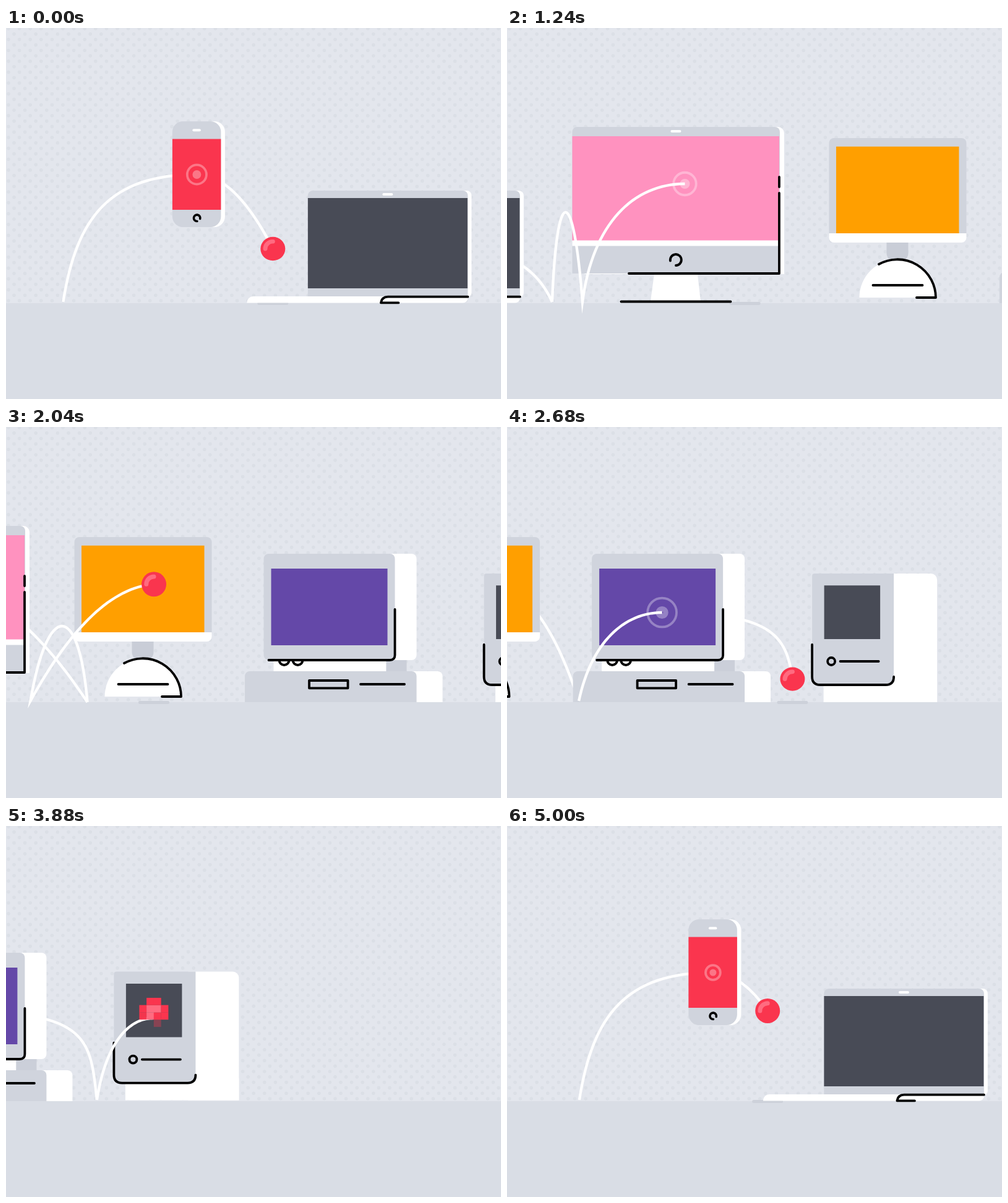
Recreate the animation shown at these times as an HTML page with a canvas. Size 800 by 600 pixels, loop 5040 ms.

```html
<!DOCTYPE html>
<html lang="en">
<head>
<meta charset="utf-8">
<title>Bouncing through devices</title>
<style>
html, body { margin: 0; width: 100%; height: 100%; overflow: hidden; background: #e3e6ed; }
canvas { display: block; }
</style>
</head>
<body>
<canvas id="stage" width="800" height="600"></canvas>
<script>
const LOOP = 5040, FLOOR = 445;
const WHITE = '#fff', GRAY = '#d0d4dd', DARK = '#484b56', RED = '#fa354e', BLUSH = '#ff6b80';
const ctx = document.getElementById('stage').getContext('2d');
const clamp = v => Math.max(0, Math.min(1, v));
const span = (t, a, b) => clamp((t - a) / (b - a));

// Camera: [time, x], smooth through all points
const camKeys = [[-800, -375], [-560, -294], [-40, -24.5], [0, 0], [800, 477], [1240, 725.5],
  [2040, 1135.5], [2680, 1415], [3360, 1643], [3880, 1734], [4100, 1745]];

function slope(i) {
  if (i < 1 || i >= camKeys.length - 1) return 0;
  const [p, q, r] = camKeys.slice(i - 1, i + 2);
  const h0 = q[0] - p[0], h1 = r[0] - q[0];
  return (h1 * (q[1] - p[1]) / h0 + h0 * (r[1] - q[1]) / h1) / (h0 + h1);
}

function camera(t) {
  const last = camKeys.length - 1;
  if (t <= camKeys[0][0]) return camKeys[0][1];
  if (t >= camKeys[last][0]) return camKeys[last][1];
  const i = camKeys.findIndex(k => k[0] > t) - 1;
  const [t0, x0] = camKeys[i], [t1, x1] = camKeys[i + 1];
  const h = t1 - t0, s = (t - t0) / h, r = 1 - s;
  return x0 * (1 + 2 * s) * r * r + x1 * s * s * (3 - 2 * s) +
    h * s * r * (r * slope(i) - s * slope(i + 1));
}

// Ball path: [time, x, y, ease a, ease b, hop height]
const nodes = [
  [-327, 93, 443],
  [-141, 309, 237, .1, .35],
  [45, 470, 443, .333, .667],
  [285, 619, 353, .12, .6],
  [571, 799, 443, .55, .85],
  [883, 848, 443, .15, .7, 145],
  [1062, 1013.5, 252, .1, .5],
  [1530, 1267.5, 445, .333, .667],
  [1816, 1175.5, 443, .15, .7, 122],
  [2050, 1383, 254, .333, .667],
  [2235, 1531.5, 443, .4, .72],
  [2400, 1666, 300, .15, .55],
  [2724, 1881, 443, .95, .95],
  [2900, 1971, 311, .15, .55]
];
const START = nodes[0][0], END = nodes[nodes.length - 1][0];

const segs = nodes.slice(1).map(([t1, x1, y1, a, b, hop = 0], i) => {
  const [t0, x0, y0] = nodes[i];
  const fall = !hop && y1 > y0;
  return {
    t0, t1, behind: fall || i === 0,
    at(t) {
      const s = (t - t0) / (t1 - t0), r = 1 - s;
      const fx = 3 * r * r * s * a + 3 * r * s * s * b + s * s * s;
      const fy = hop ? s : fall ? s * s : 1 - r * r;
      return [x0 + (x1 - x0) * fx, y0 + (y1 - y0) * fy - 4 * hop * s * r];
    }
  };
});
const landings = nodes.filter(n => n[2] > 440).map(n => n[0]);
const segAt = t => segs.find(s => t >= s.t0 && t < s.t1);

// Drawing helpers
function box(x0, y0, x1, y1, color, r = 0) {
  ctx.fillStyle = color;
  ctx.beginPath();
  ctx.roundRect(x0, y0, x1 - x0, y1 - y0, r);
  ctx.fill();
}
function disc(x, y, r, color) {
  ctx.fillStyle = color;
  ctx.beginPath();
  ctx.arc(x, y, r, 0, 7);
  ctx.fill();
}
function ink(d, width = 3.8, color = '#000', fill) {
  const p = new Path2D(d);
  ctx.lineWidth = width;
  ctx.lineCap = ctx.lineJoin = 'round';
  ctx.strokeStyle = color;
  if (fill) { ctx.fillStyle = fill; ctx.fill(p); }
  ctx.stroke(p);
}
function shape(d, color) {
  ctx.fillStyle = color;
  ctx.fill(new Path2D(d));
}
function at(x, y, draw) {
  ctx.save();
  ctx.translate(x, y);
  draw();
  ctx.restore();
}

// Devices, each in its own local frame
function phone() {
  box(10, 151, 85, 322, WHITE, 17);
  box(0, 151, 78.5, 322, GRAY, 17);
  box(0, 179.5, 78.5, 294, RED);
  box(32.5, 163.3, 46, 167.2, WHITE, 2);
  ink('M40 312.5A5.2 5.2 0 1 1 44.8 308.5', 3.6);
}
function laptop() {
  box(110, 263, 363, 436, WHITE, 8);
  box(98.5, 263, 357, 435, GRAY, [8, 8, 0, 0]);
  box(98.5, 275, 356.5, 421, DARK);
  box(219, 267, 236, 271, WHITE, 2);
  box(0, 434, 357, 444.5, WHITE, [10, 0, 8, 0]);
  ink('M357 434.7H228Q218 435 216.5 444.4H245');
}
function desktop() {
  box(20, 160, 342.5, 398, WHITE, [0, 10, 0, 0]);
  box(0, 160, 335.5, 397, GRAY, [8, 8, 0, 0]);
  box(0, 175, 334.5, 344, '#ff92bf');
  box(0, 343.5, 334.5, 352.5, WHITE);
  box(159, 165, 176, 169, WHITE, 2);
  shape('M132.5 398H202.5L207.5 442H126.5Z', WHITE);
  ink('M334.5 241V257M334.5 267V397H91.5M79 442.5H256');
  ink('M158.5 376.5A9 9 0 1 1 167.5 384');
}
function lamp() {
  box(93, 340, 128, 378, '#c9cdd7', [0, 0, 14, 14]);
  box(0, 178, 222, 342, GRAY, 8);
  box(11.5, 191.7, 210, 333, '#ff9f00');
  box(0, 332, 222, 347, WHITE, [0, 0, 8, 8]);
  shape('M49 436A62 62 0 0 1 173 436Z', WHITE);
  ink('M80.5 382A62 62 0 0 1 172.5 436H141.5M71 416H151');
}
function tower() {
  box(200, 395, 319.5, FLOOR, WHITE, [0, 8, 0, 0]);
  box(0, 395, 277.5, FLOOR, GRAY, [8, 8, 0, 0]);
  box(46.5, 376, 228.5, 395, WHITE);
  box(228.5, 376, 261.5, 395, '#cbcfd9');
  box(200, 205, 277.5, 377, WHITE, 8);
  ink('M55.5 377A8 8 0 0 0 71.5 377M77.5 377A8 8 0 0 0 93.5 377');
  box(30.5, 205, 242.5, 377, GRAY, 8);
  box(42.5, 229, 230.5, 353, '#6448a8');
  ink('M38.5 377H234Q242.5 377 242.5 369V295');
  ink('M104 410H166.5V422.3H104ZM187 416H258');
}
function classic(t) {
  box(18.5, 410, 202, FLOOR, WHITE);
  box(120, 237, 202, FLOOR, WHITE, [0, 10, 0, 0]);
  box(0, 237, 132, 417, GRAY, [4, 0, 12, 12]);
  box(19.5, 256.3, 110, 343, DARK);
  ink('M0 352V404Q0 417 13 417H119Q132 417 132 404');
  ink('M25 379a6 6 0 1 0 12 0a6 6 0 1 0 -12 0M45.5 379H107.5');
}

function pixels(t) {
  if (t < END) return;
  const c = 11.7;
  let n = 0;
  for (let row = 3; row >= 0; row--) {
    for (let col = 0; col < 4; col++) {
      const edgeRow = row % 3 === 0, edgeCol = col % 3 === 0;
      if (edgeRow && edgeCol) continue;
      const gone = 3850 + 15 * n++;
      ctx.globalAlpha = 1 - span(t, gone, gone + 25);
      const light = !edgeRow && !edgeCol && row + col < 4;
      const x = 41 + col * c, y = 279.3 + row * c;
      box(x, y, x + c + .2, y + c + .2, light ? BLUSH : RED);
    }
  }
  ctx.globalAlpha = 1;
}

function target(time, node) {
  const [hit, x, y] = nodes[node], age = time - hit;
  if (age < 0) return;
  const r = 32 * (1 - Math.exp(-age / 180));
  const hole = Math.min(7, Math.max(0, (age - 200) * .022));
  const core = Math.max(hole + .1, r * .4);
  ctx.strokeStyle = ctx.fillStyle = 'rgba(255,255,255,.32)';
  ctx.lineWidth = Math.min(3.8, r);
  ctx.beginPath();
  ctx.arc(x, y, Math.max(.1, r - 1.9), 0, 7);
  ctx.stroke();
  ctx.beginPath();
  ctx.arc(x, y, core, 0, 7);
  ctx.arc(x, y, hole, 0, 7);
  ctx.fill('evenodd');
}

function trail(from, to, behind) {
  ctx.strokeStyle = WHITE;
  ctx.lineWidth = 4.3;
  ctx.lineCap = 'butt';
  ctx.lineJoin = 'miter';
  ctx.beginPath();
  let joined = false;
  for (const s of segs) {
    const a = Math.max(from, s.t0), b = Math.min(to, s.t1);
    if (s.behind !== behind || a >= b) { joined = false; continue; }
    for (let i = joined ? 1 : 0; i <= 32; i++) {
      const p = s.at(a + (b - a) * i / 32);
      if (i || joined) ctx.lineTo(...p); else ctx.moveTo(...p);
    }
    joined = true;
  }
  ctx.stroke();
}

function ball(time, behind) {
  const s = segAt(time);
  if (!s || s.behind !== behind) return;
  const near = Math.min(...landings.map(l => Math.abs(l - time)));
  const squash = 1 - .33 * clamp(1 - near / 50);
  const grow = span(time, START, START + 50);
  at(...s.at(time), () => {
    ctx.scale(grow, squash * grow);
    disc(0, 0, 20, RED);
    ink('M-12.3 0A12.3 12.3 0 0 1 0 -12.3', 7, BLUSH);
  });
}

function backdrop() {
  box(0, 0, 800, 600, '#e3e6ed');
  ctx.fillStyle = '#dbdfe6';
  ctx.beginPath();
  for (let row = 0; row < 52; row++) {
    for (let x = row % 2 ? 13 : 4; x < 810; x += 17.6) {
      const y = row * 8.8 + 1;
      ctx.moveTo(x + 2.8, y);
      ctx.arc(x, y, 2.8, 0, 7);
    }
  }
  ctx.fill();
  box(0, FLOOR, 800, 600, '#d9dde5');
}

// Hop up, then drop out of the stage
function exitY(t, begin, height) {
  const up = span(t, begin, begin + 255), down = span(t, begin + 255, begin + 535);
  return -height * (1 - Math.cos(Math.PI * up)) / 2 + (height + 400) * down * down;
}
const enterY = (t, begin, depth) => depth * (1 - span(t, begin, begin + 190)) ** 3;

function draw(t) {
  const time = t > 4200 ? t - LOOP : t;
  const cam = camera(time), oldCam = camera(t);
  const fresh = time < 0;
  const phoneY = fresh ? enterY(t, 4280, 470) : 0;
  const laptopY = fresh ? enterY(t, 4490, 350) : 0;
  const macY = exitY(t, 3865, 145);
  const wipe = t > 3920 && !fresh ? 2400 + 500 * span(t, 3920, 4080) : START;

  backdrop();
  at(-cam, 0, () => {
    const s = segAt(time);
    if (s) {
      const x = s.at(time)[0];
      box(x - 25, 443, x + 25, 448, '#cdd1da', 2.5);
    }
    trail(wipe, time, true);
    ball(time, true);
  });

  at(269.5 - cam, phoneY, phone);
  at(390 - cam, laptopY, laptop);
  at(831.5 - cam, 0, desktop);
  at(1246.5 - cam, 0, lamp);
  at(1522 - oldCam, exitY(t, 3900, 70), tower);
  at(1908.5 - oldCam, macY, classic);

  at(-cam, 0, () => {
    [1, 3, 6, 9].forEach(n => target(time, n));
    if (t < 3900) target(time, 11);
    trail(wipe, time, false);
  });
  at(1908.5 - oldCam, macY, () => pixels(t));
  at(-cam, 0, () => ball(time, false));
}

const begin = performance.now();
function tick() {
  draw((performance.now() - begin) % LOOP);
  requestAnimationFrame(tick);
}
tick();
</script>
</body>
</html>
```
